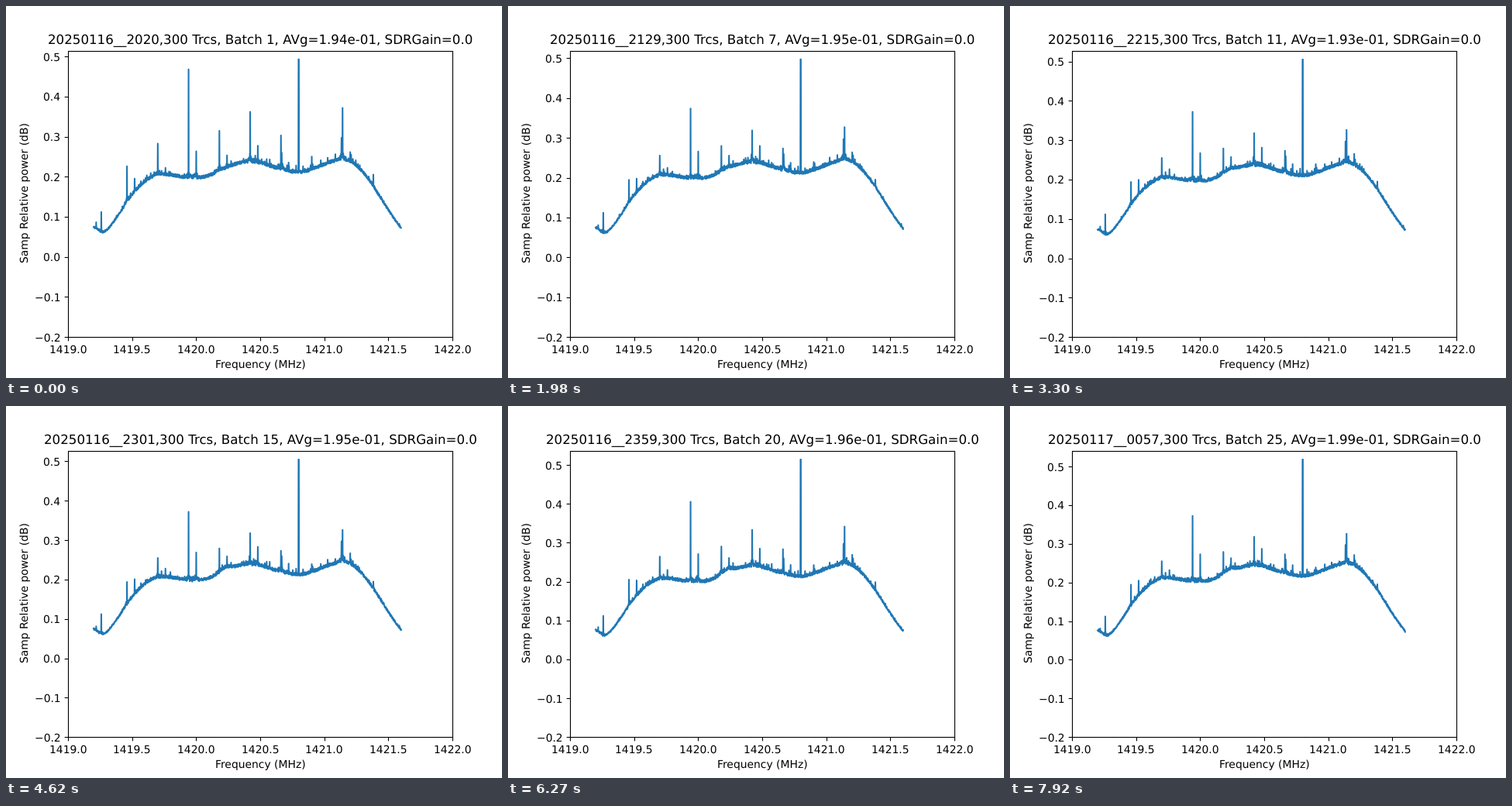
An HTML page with a canvas for the animation above (8000 ms loop, 640x480 px).

```html
<!DOCTYPE html>
<html lang="en">
<head>
<meta charset="utf-8">
<title>Spectrum batches</title>
<style>
html, body { margin: 0; width: 100%; height: 100%; overflow: hidden; background: #fff; }
canvas { display: block; width: 640px; height: 480px; }
</style>
</head>
<body>
<canvas id="plot" width="640" height="480"></canvas>
<script>
const ctx = document.getElementById('plot').getContext('2d');
const LOOP = 8000, STEP = 330, BATCHES = 25;
const BOX = { left: 80, right: 576, top: 57.6, bottom: 427.2 };
const MHZ = (BOX.right - BOX.left) / 3;
const F_MIN = 0.2, F_SPAN = 2.4, BINS = 2048, Y_MIN = -0.2;
const FONT = '"DejaVu Sans", sans-serif', SIZE = 13.889, TITLE_SIZE = 16.667;

// Batch, average power, tallest line.
const KEYS = [
  [1, 1.94, 0.4927], [4, 1.93, 0.4935], [9, 1.96, 0.4993], [11, 1.93, 0.5051],
  [15, 1.95, 0.505], [20, 1.96, 0.514], [25, 1.99, 0.518]
];

// Turning points of the passband: MHz above 1419.2, level, skew of the ease.
const TURNS = [
  [0, 0.0735], [0.068, 0.06], [0.535, 0.206, 0.75], [0.79, 0.197],
  [1.215, 0.238], [1.59, 0.2115], [1.95, 0.243], [2.58, 0.036, 0.96]
];

// Two combs of interference with equal spacing, and single lines (MHz above 1419).
const SPACING = 0.2403;
const BURSTING = { first: 0.22, levels: [0.081, 0.194, 0.255, 0.372, 0.279, 0.318, 0.273, 0.239, 0.326, 0.195] };
const STEADY = { first: 0.52, levels: [0.2, 0.227, 0.268, 0.258, 0.282, 0.24, 0.23, 0.266] };
const SINGLES = [[0.26, 0.112], [1.668, 0.26], [1.78, 0.228], [2.134, 0.297]];
const TALLEST_AT = 1.8;

function random(seed) {
  let s = seed >>> 0;
  return () => {
    s = (s + 0x6d2b79f5) >>> 0;
    let r = Math.imul(s ^ (s >>> 15), s | 1);
    r ^= r + Math.imul(r ^ (r >>> 7), r | 61);
    return ((r ^ (r >>> 14)) >>> 0) / 4294967296;
  };
}

// Pair of rows around v in a list sorted by its first column, and the fraction between.
function between(rows, v) {
  let i = 0;
  while (i < rows.length - 2 && v > rows[i + 1][0]) i++;
  const a = rows[i], b = rows[i + 1];
  return [a, b, (v - a[0]) / (b[0] - a[0])];
}

function keyed(column, n) {
  const [a, b, t] = between(KEYS, n);
  return a[column] + (b[column] - a[column]) * t;
}
const average = n => keyed(1, n);
const tallest = n => keyed(2, n);

function band(f) {
  const [a, b, t] = between(TURNS, f);
  const ease = (1 - Math.cos(Math.PI * t ** (b[2] || 1))) / 2;
  return a[1] + (b[1] - a[1]) * ease;
}

const binFreq = i => F_MIN + F_SPAN * i / (BINS - 1);
const freqBin = f => Math.round((f - F_MIN) / F_SPAN * (BINS - 1));
const freqX = f => BOX.left + f * MHZ;

// Interference lines as [bin, level] for one batch.
function lines(n, base) {
  const activity = Math.exp(-(n - 1) / 1.5) + 0.35 * Math.exp(-(((n - 20) / 2) ** 2));
  const drift = 0.0004 * (n - 13);
  const comb = ({ first, levels }, change) => levels.map((v, k) => {
    const bin = freqBin(first + k * SPACING);
    return [bin, v + change(v - base[bin])];
  });
  return [
    ...comb(BURSTING, height => 0.55 * height * activity),
    ...comb(STEADY, () => drift),
    ...SINGLES.map(([f, v]) => [freqBin(f), v])
  ];
}

function spectrum(n) {
  const gain = average(n) / 1.94;
  const bump = 0.008 * Math.min(1, (n - 1) / 14);
  const rnd = random(n * 7919), fixed = random(42);
  const base = Array.from({ length: BINS }, (_, i) => {
    const f = binFreq(i);
    return band(f - F_MIN) * gain + bump * Math.exp(-(((f - 1.23) / 0.055) ** 2));
  });
  const out = base.map(v => v + (rnd() - 0.5) * (0.003 + 0.022 * v));

  // Faint lines that stay put from batch to batch.
  for (let k = 0; k < 110; k++) {
    const i = Math.floor(fixed() * BINS);
    out[i] += (0.003 + 0.008 * fixed() ** 2) * base[i] / 0.2;
  }
  const found = lines(n, base);
  for (const [c, v] of found) {
    const skirt = Math.min(0.018, (v - base[c]) * 0.2);
    for (let i = Math.max(0, c - 40); i < Math.min(BINS, c + 41); i++) {
      out[i] += skirt * Math.exp(-Math.abs(i - c) / 12) * rnd();
    }
  }
  for (const [c, v] of found) out[c] = v;
  const top = freqBin(TALLEST_AT);
  out.fill(tallest(n), top - 1, top + 2);
  return out;
}

function text(str, x, y, size, align) {
  ctx.font = size + 'px ' + FONT;
  const w = ctx.measureText(str).width;
  ctx.fillText(str, Math.round(x - (align === 'right' ? w : w / 2)), y);
}

const snap = v => Math.floor(v + 0.5) + 0.5;

function segment(x1, y1, x2, y2) {
  ctx.beginPath();
  ctx.moveTo(x1, y1);
  ctx.lineTo(x2, y2);
  ctx.stroke();
}

function title(n) {
  const minutes = 20 * 60 + 20 + Math.floor(11.55 * (n - 1));
  const day = minutes < 1440 ? '20250116' : '20250117';
  const two = v => String(v).padStart(2, '0');
  const clock = two(Math.floor(minutes / 60) % 24) + two(minutes % 60);
  return `${day}__${clock},300 Trcs, Batch ${n}, AVg=${average(n).toFixed(2)}e-01, SDRGain=0.0`;
}

function drawAxes(yPix) {
  const low = snap(BOX.bottom), left = snap(BOX.left), high = snap(BOX.top);
  ctx.strokeStyle = ctx.fillStyle = '#000';
  ctx.lineWidth = 1.11;
  ctx.lineJoin = 'miter';
  ctx.lineCap = 'butt';
  for (let f = 0; f <= 3; f += 0.5) {
    const x = freqX(f);
    segment(snap(x), low, snap(x), low + 4.86);
    text((1419 + f).toFixed(1), x, 448, SIZE);
  }
  for (let k = -2; k <= 5; k++) {
    const y = yPix(k / 10);
    segment(left, snap(y), left - 4.86, snap(y));
    const label = (k < 0 ? '\u2212' : '') + (Math.abs(k) / 10).toFixed(1);
    text(label, 70.28, Math.round(y + 5.5), SIZE, 'right');
  }
  ctx.strokeRect(left, high, snap(BOX.right) - left, low - high);
}

function draw(n) {
  const yMax = tallest(n) + 0.05 * (tallest(n) - 0.059);
  const scale = (BOX.bottom - BOX.top) / (yMax - Y_MIN);
  const yPix = v => BOX.bottom - (v - Y_MIN) * scale;

  ctx.fillStyle = '#fff';
  ctx.fillRect(0, 0, 640, 480);

  ctx.strokeStyle = '#1f77b4';
  ctx.lineWidth = 2.083;
  ctx.lineJoin = 'round';
  ctx.lineCap = 'square';
  ctx.beginPath();
  spectrum(n).forEach((v, i) => ctx.lineTo(freqX(binFreq(i)), yPix(v)));
  ctx.stroke();

  drawAxes(yPix);
  text(title(n), 328, 49, TITLE_SIZE);
  text('Frequency (MHz)', 328, 467, SIZE);
  ctx.save();
  ctx.translate(28, 242);
  ctx.rotate(-Math.PI / 2);
  text('Samp Relative power (dB)', 0, 0, SIZE);
  ctx.restore();
}

const start = performance.now();
let shown = 0;
function tick() {
  const t = (performance.now() - start) % LOOP;
  const n = Math.min(BATCHES, Math.floor(t / STEP) + 1);
  if (n !== shown) draw(shown = n);
  requestAnimationFrame(tick);
}
ctx.textRendering = 'geometricPrecision';
tick();
</script>
</body>
</html>
```
